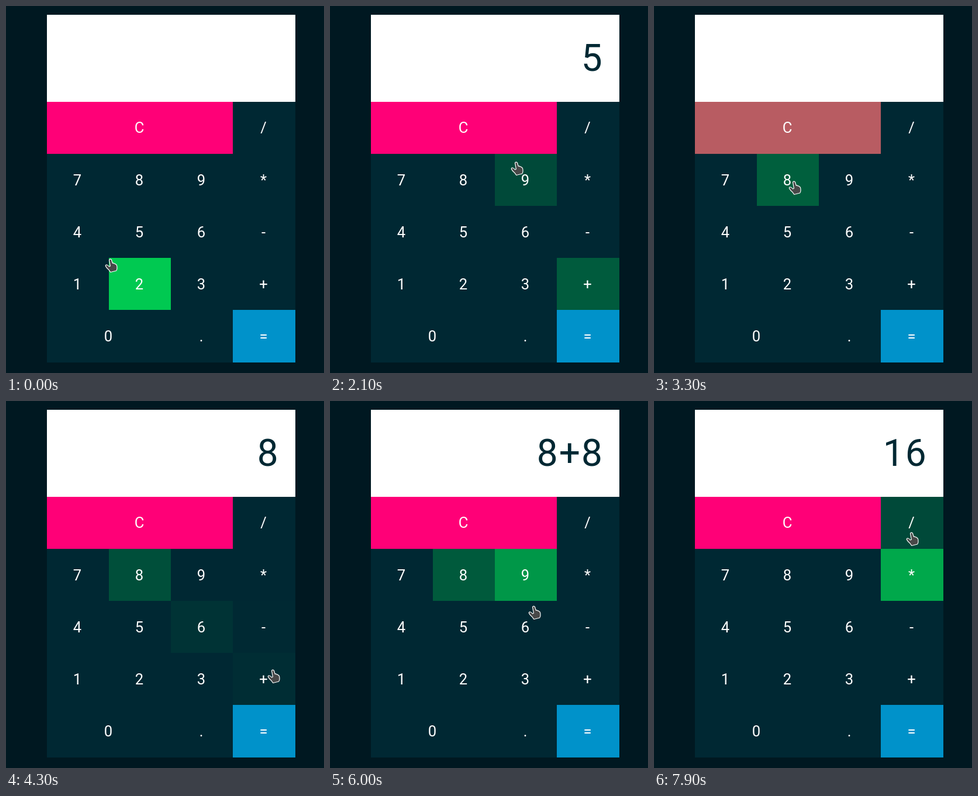
An HTML page that plays this animation: 544x628 px, repeating every 8000 ms.

```html
<!DOCTYPE html>
<html lang="en">
<head>
<meta charset="utf-8">
<title>Calculator</title>
<style>
  html, body { margin: 0; width: 100%; height: 100%; overflow: hidden; background: #001821; }
  svg { display: block; width: 544px; height: 628px; font-family: Roboto, sans-serif; }
  .key { font-size: 25.6px; fill: #fff; text-anchor: middle; }
  #display { font-size: 64px; letter-spacing: 2px; fill: #002833; }
</style>
</head>
<body>
<svg viewBox="0 0 544 628">
  <rect x="70" y="15" width="425" height="149" fill="#fff"/>
  <text id="display" y="111"></text>
  <g id="keys" shape-rendering="crispEdges"></g>
  <path id="hand" fill="#484848" stroke="#fff" stroke-width="1.2" stroke-linejoin="round"
    d="M-2.5 .8C-2.2-1.2 .8-1.4 1.5 .5L3.2 6.2Q5 5.4 6 7Q8 6.4 8.8 8.2Q10.4 8.6 10.8 11L11 14.5Q11 17 9.6 19L-.2 21.5Q-2.4 17.6-6 14.8L-8.6 11.2Q-9.2 8.6-6.4 9Q-4.4 9.4-2.6 12L-.6 11Z"/>
</svg>
<script>
const LOOP = 8000, STEP = 100, FADE = 500;
const BASE = [0, 40, 51], GREEN = [0, 201, 81], PINK = [255, 0, 119], BLUE = [0, 146, 202];
const DUSTY = [181, 95, 97], DUSTY_LEVEL = .36;
const COLS = [70, 176, 282, 388, 495];
const ROWS = [164, 253, 342, 431, 520, 610];
const BASELINES = [217, 307, 396, 485, 574];
const LAYOUT = ['CCC/', '789*', '456-', '123+', '00.='];

// [time, key under the pointer]
const HOVERS = [
  [-1000, '2'], [120, '5'], [1050, '6'], [1130, '3'], [1170, '+'], [1900, ''],
  [2020, '9'], [2110, 'C'], [3110, ''], [3190, '8'], [4070, ''], [4130, '6'],
  [4230, '-'], [4275, '+'], [4860, '8'], [5797, '9'], [6005, '6'], [6060, '+'],
  [6120, '='], [7010, '+'], [7070, '-'], [7160, '*'], [7820, '/']
];

// [time, text]
const SCREENS = [[0, ''], [800, '5'], [2800, ''], [3800, '8'], [4700, '8+'], [5500, '8+8'], [6700, '16']];

// [time in steps, x, y] of the fingertip
const PATH = [
  [0, 179, 434], [1, 179, 434], [2, 206, 396], [3, 222, 388], [9, 222, 388],
  [10, 250, 384], [11, 330, 400], [12, 425, 455], [13, 444, 468], [18, 444, 468],
  [19, 420, 440], [21, 319, 268], [22, 290, 232], [23, 272, 220], [30, 272, 220],
  [31, 265, 240], [32, 248, 285], [33, 240, 301], [39, 240, 301],
  [40, 250, 303], [41, 280, 330], [43, 457, 461], [44, 450, 470], [48, 450, 470],
  [49, 300, 330], [50, 240, 300], [57, 240, 300], [58, 270, 306], [59, 325, 325],
  [60, 349, 352], [61, 405, 470], [62, 435, 555], [68, 435, 555], [69, 432, 540],
  [70, 426, 511], [71, 428, 420], [72, 436, 320], [73, 438, 300], [77, 438, 300],
  [78, 439, 272], [79, 441, 226], [80, 441, 226]
];

const lerp = (a, b, k) => a + (b - a) * k;
const mix = (a, b, k) => a.map((v, i) => lerp(v, b[i], k));

// CSS "ease": cubic-bezier(.25, .1, .25, 1)
function ease(x) {
  if (x <= 0) return 0;
  if (x >= 1) return 1;
  const curve = (p, q, s) => 3 * p * s * (1 - s) ** 2 + 3 * q * s * s * (1 - s) + s ** 3;
  let lo = 0, hi = 1;
  for (let i = 0; i < 20; i++) {
    const mid = (lo + hi) / 2;
    if (curve(.25, .25, mid) < x) lo = mid; else hi = mid;
  }
  return curve(.1, 1, lo);
}

// Hover strength of a key, with interrupted fades running back in proportion.
function hoverLevel(name, time) {
  let from = 0, to = 0, start = -2000;
  const at = t => from === to ? to : lerp(from, to, ease((t - start) / (FADE * Math.abs(to - from))));
  for (const [when, key] of HOVERS) {
    if (when > time) break;
    const goal = +(key === name);
    if (goal === to) continue;
    from = at(when);
    to = goal;
    start = when;
  }
  return at(time);
}

function keyColor(name, level) {
  if (name === 'C') {
    return level < DUSTY_LEVEL
      ? mix(PINK, DUSTY, level / DUSTY_LEVEL)
      : mix(DUSTY, GREEN, (level - DUSTY_LEVEL) / (1 - DUSTY_LEVEL));
  }
  return mix(name === '=' ? BLUE : BASE, GREEN, level);
}

function add(tag, attrs, text = '') {
  const node = document.createElementNS('http://www.w3.org/2000/svg', tag);
  for (const name in attrs) node.setAttribute(name, attrs[name]);
  node.textContent = text;
  return document.getElementById('keys').appendChild(node);
}

const keys = LAYOUT.flatMap((row, r) => [...new Set(row)].map(name => {
  const left = COLS[row.indexOf(name)], right = COLS[row.lastIndexOf(name) + 1];
  const rect = add('rect', { x: left, y: ROWS[r], width: right - left, height: ROWS[r + 1] - ROWS[r] });
  add('text', { class: 'key', x: (left + right) / 2 - 1, y: BASELINES[r] }, name);
  return { name, rect };
}));

const display = document.getElementById('display');
const hand = document.getElementById('hand');

function draw(time) {
  for (const { name, rect } of keys) {
    const rgb = keyColor(name, hoverLevel(name, time)).map(Math.round);
    rect.setAttribute('fill', `rgb(${rgb})`);
  }
  const text = SCREENS.filter(([when]) => when <= time).pop()[1];
  display.textContent = text;
  display.setAttribute('x', 467.6 - 37.94 * text.length);

  const step = time / STEP;
  const i = PATH.findIndex(point => point[0] > step);
  const [, x, y] = mix(PATH[i - 1], PATH[i], (step - PATH[i - 1][0]) / (PATH[i][0] - PATH[i - 1][0]));
  hand.setAttribute('transform', `translate(${Math.round(x)} ${Math.round(y)})`);
}

const begin = performance.now();
function tick() {
  const time = (performance.now() - begin) % LOOP;
  draw(Math.floor(time / STEP) * STEP);
  requestAnimationFrame(tick);
}
tick();
</script>
</body>
</html>
```
